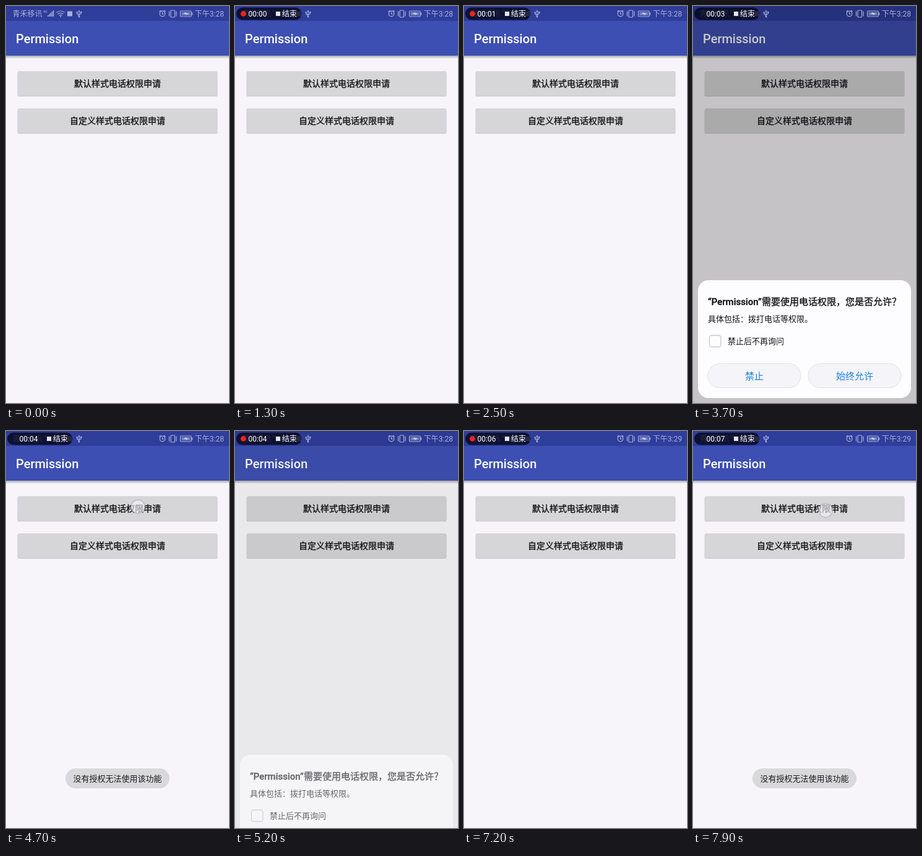
An HTML page that plays this animation: 360 px wide and 640 px high, repeating every 8000 ms.

```html
<!DOCTYPE html>
<html lang="zh-CN">
<head>
<meta charset="utf-8">
<title>Permission</title>
<style>
  html, body { margin: 0; width: 100%; height: 100%; overflow: hidden; background: #f7f5f9; }
  svg { display: block; width: 100%; height: 100%; }
  text { font-family: Roboto, "Noto Sans CJK SC", "Noto Sans CJK", sans-serif; white-space: pre; }
  .mid { text-anchor: middle; }
  .medium { font-weight: 500; }
  .heavy { stroke: #141316; stroke-width: .35; }
  .line { fill: none; stroke: #a8afd7; stroke-width: 1.2; }
  .button { fill: #d6d5d7; }
  .shade { fill: #000; opacity: .16; }
  .pillButton { fill: #f5f4f8; stroke: #e1e0e5; }
  .touch { fill: #f4f3fa; fill-opacity: .62; stroke: #b3b1c4; stroke-opacity: .75; stroke-width: 1.5; }
</style>
</head>
<body>
<svg viewBox="0 0 360 640">
  <defs>
    <linearGradient id="barShadow" x2="0" y2="1">
      <stop offset="0" stop-opacity=".32"/>
      <stop offset="1" stop-opacity="0"/>
    </linearGradient>
  </defs>

  <rect width="360" height="640" fill="#f7f5f9"/>
  <rect y="80" width="360" height="5" fill="url(#barShadow)"/>
  <rect width="360" height="80" fill="#3d4fb2"/>
  <rect width="360" height="24" fill="#2f3d9b"/>
  <text class="medium" x="16" y="59.500" font-size="20" fill="#fff">Permission</text>

  <g class="mid medium" font-size="14" fill="#141316">
    <rect class="shade" x="18.500" y="106" width="323" height="40" rx="2.500"/>
    <rect class="button" x="19" y="105" width="322" height="39.500" rx="2"/>
    <text class="heavy" x="180" y="130.300">默认样式电话权限申请</text>
    <rect class="shade" x="18.500" y="166" width="323" height="40" rx="2.500"/>
    <rect class="button" x="19" y="165" width="322" height="39.500" rx="2"/>
    <text class="heavy" x="180" y="190.300">自定义样式电话权限申请</text>
  </g>

  <rect id="dim" width="360" height="640"/>

  <!-- status bar, kept bright above the dimmed screen -->
  <g fill="#a8afd7" font-size="12">
    <text x="10.500" y="17">青禾移讯</text>
    <text x="60" y="11" font-size="5.500">4G</text>
    <path d="M67 17v-2h1.5v2zM69.2 17v-4h1.5v4zM71.4 17v-6h1.5v6zM73.6 17v-8h1.5v8zM75.8 17v-10h1.5v10z"/>
    <path class="line" d="M81.500 10.500q6.500-5 13 0M83.500 13q4.500-3.500 9 0M85.500 15.300q2.500-2 5 0"/>
    <circle cx="88" cy="17" r="1.100"/>
    <rect x="99" y="8.500" width="8" height="8"/>
    <path class="line" d="M118 8v10M114.800 10.500v2.500l3.200 2.500M121.200 10v2.500l-3.200 2"/>
    <path d="M116.300 9l1.700-2.500 1.700 2.500zM120 9h2.400v2.200H120z"/>
    <circle cx="118" cy="17.300" r="1.300"/>
    <circle cx="114.800" cy="10.500" r="1.200"/>
    <g class="line">
      <circle cx="252.500" cy="12.500" r="4.300"/>
      <path d="M252.500 9.800v3h2.200M247.500 9.300l2.500-2.300M257.500 9.300l-2.500-2.300"/>
      <rect x="266" y="7" width="6.500" height="11" rx="1"/>
      <path d="M263.500 8.500v8M275 8.500v8"/>
      <rect x="281.500" y="8" width="17.500" height="9" rx="1"/>
    </g>
    <rect x="283.300" y="9.700" width="14" height="5.600" opacity=".55"/>
    <path d="M286 12.500l5-2.300v1.500h4.500l-5 2.800v-1.500z" fill="#d5d9ef"/>
    <rect x="299.500" y="10.500" width="1.700" height="4"/>
    <text id="clock" x="352" y="17" text-anchor="end"></text>
  </g>

  <g id="toast">
    <rect x="96" y="544" width="168" height="32" rx="16" fill="#d9d8db"/>
    <text class="mid" x="180" y="565" font-size="13" fill="#1c1b1e">没有授权无法使用该功能</text>
  </g>

  <g id="dialog" fill="#141316">
    <rect x="8" y="442" width="344" height="190" rx="17" fill="#fdfcff"/>
    <text class="medium heavy" x="24" y="481.800" font-size="15">“Permission”需要使用电话权限，您是否允许？</text>
    <text x="24" y="508.800" font-size="13">具体包括：拨打电话等权限。</text>
    <rect id="box" x="26.500" y="531" width="18.500" height="18.500" rx="3.500" stroke-width="1.300"/>
    <path id="tick" d="M31 540.500l3.500 3.500 6.500-7" fill="none" stroke="#fff" stroke-width="1.800"/>
    <text x="56" y="545.200" font-size="13">禁止后不再询问</text>
    <rect class="pillButton" x="24" y="576.500" width="150" height="39" rx="19.500"/>
    <rect class="pillButton" x="186" y="576.500" width="150" height="39" rx="19.500"/>
    <g class="mid" font-size="15" fill="#1a80dd">
      <text x="99" y="601.800">禁止</text>
      <text x="261" y="601.800">始终允许</text>
    </g>
  </g>

  <g id="recorder" font-size="12" fill="#fff">
    <rect x="2" y="2.500" width="105.500" height="20" rx="10" fill="#05071a" fill-opacity=".8"/>
    <circle id="dot" cx="13.500" cy="12.500" r="4.400" fill="#f0241c"/>
    <text id="timer" x="21.500" y="17"></text>
    <rect x="66" y="9" width="7" height="7" fill="#e6e6ea"/>
    <text x="76" y="17">结束</text>
  </g>

  <circle id="touch" class="touch" r="11"/>
</svg>
<script>
const LOOP = 8000, STEP = 100;
const $ = id => document.getElementById(id);
const ramp = (t, from, length) => Math.min(1, Math.max(0, (t - from) / length));
const easeOut = p => 1 - (1 - p) ** 3;
const show = (id, visible) => $(id).setAttribute("visibility", visible ? "visible" : "hidden");
const set = (id, attributes) => {
  for (const name in attributes) $(id).setAttribute(name, attributes[name]);
};

// [opening, closing] times
const dialogs = [[1350, 2150], [3200, 4100], [5100, 6850]];
const toasts = [[2550, 3200], [4450, 5100], [7300, LOOP + 500]];
// [start, end, x, y]
const touches = [
  [800, 1000, 213, 124], [1950, 2150, 99, 593], [2750, 2950, 213, 123],
  [3900, 4100, 99, 593], [4650, 4850, 213, 122], [5950, 6100, 37, 544],
  [6600, 6850, 99, 593], [7850, LOOP, 214, 128]
];

function draw(t) {
  const current = dialogs.findLast(([opening]) => t >= opening) || dialogs[0];
  const opened = ramp(t, current[0], 380), closed = ramp(t, current[1], 300);
  const presence = easeOut(opened) * (1 - closed ** 2);
  set("dim", { opacity: 0.205 * opened * (1 - closed) });
  set("dialog", { transform: `translate(0 ${200 * (1 - presence)})`, opacity: presence });

  const pressed = t >= 5950 && t < 6100, checked = t >= 6100;
  set("box", {
    fill: checked ? "#1a80dd" : "#fdfcff",
    stroke: checked || pressed ? "#1a80dd" : "#c9c8cd"
  });
  show("tick", checked && presence > 0);

  const toastLevel = ([start, end]) => ramp(t, start, 200) * (1 - ramp(t, end - 100, 100));
  set("toast", { opacity: Math.max(...toasts.map(toastLevel)) });

  const touch = touches.find(([start, end]) => t >= start && t < end);
  show("touch", touch);
  if (touch) set("touch", { cx: touch[2], cy: touch[3] });

  const recorded = Math.max(0, t - 600);
  show("recorder", t >= 400);
  show("dot", t >= 400 && recorded % 1000 >= 350);
  $("timer").textContent = "00:0" + Math.floor(recorded / 1000);
  $("clock").textContent = t < 5300 ? "下午3:28" : "下午3:29";
}

const begin = performance.now();
function tick() {
  const elapsed = (performance.now() - begin) % LOOP;
  draw(Math.floor(elapsed / STEP) * STEP);
  requestAnimationFrame(tick);
}
tick();
</script>
</body>
</html>
```
